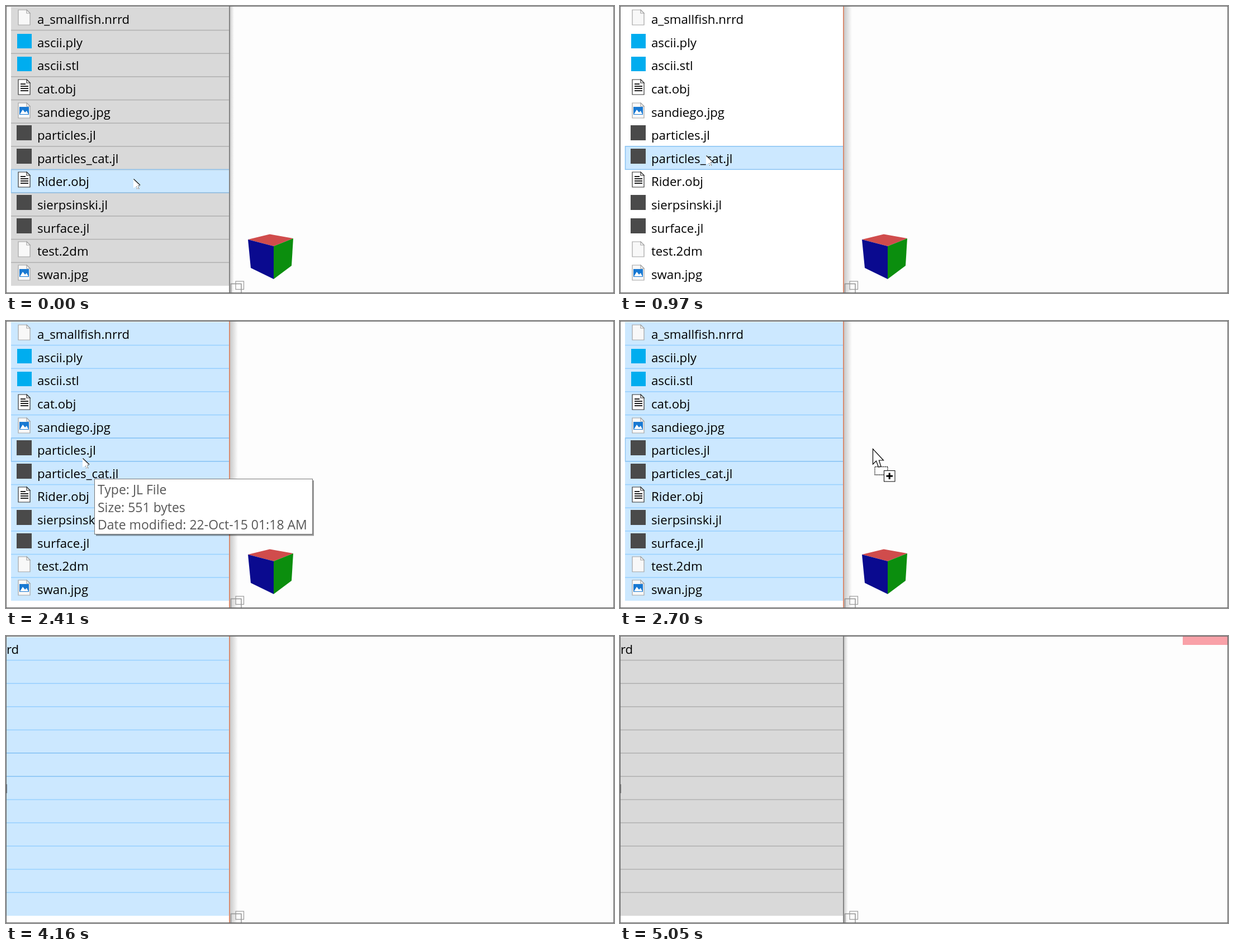
These frames come from a looping animation (1088 by 515 pixels, 8 s). An HTML page with a canvas:

```html
<!DOCTYPE html>
<html lang="en">
<head>
<meta charset="utf-8">
<title>Dragging files into a viewer</title>
<style>
  html, body { margin: 0; width: 100%; height: 100%; overflow: hidden; background: #fff; }
  canvas { display: block; width: 1088px; height: 515px; }
</style>
</head>
<body>
<canvas id="stage" width="1088" height="515"></canvas>
<script>
const ctx = document.getElementById('stage').getContext('2d');
const LOOP = 8000, WIDTH = 1088, HEIGHT = 515;
const PANEL_RIGHT = 399, LIST_LEFT = 9, LIST_WIDTH = 700, SCROLL = 198;
const FONT = '"Open Sans", "Noto Sans", sans-serif';

const files = [
  ['a_smallfish.nrrd', 'page'], ['ascii.ply', 'model'], ['ascii.stl', 'model'],
  ['cat.obj', 'text'], ['sandiego.jpg', 'image'], ['particles.jl', 'script'],
  ['particles_cat.jl', 'script'], ['Rider.obj', 'text'], ['sierpsinski.jl', 'script'],
  ['surface.jl', 'script'], ['test.2dm', 'page'], ['swan.jpg', 'image']
];

// Each entry: start time, x, y, pointer kind
const pointerPath = [
  [0, 228, 310, 'arrow'], [150, 216, 304, 'arrow'], [270, 192, 291, 'arrow'],
  [390, 166, 275, 'arrow'], [510, 154, 268, 'arrow'], [1120, 167, 246, 'arrow'],
  [2110, 157, 246, 'arrow'], [2270, 137, 246, 'arrow'],
  [2540, 76, 65, 'drag'], [2700, 452, 229, 'drag'], [2850, 428, 262, 'drag'],
  [3000, 490, 270, 'drag'], [3120, 535, 275, 'drag'], [3270, 545, 275, 'drag'],
  [3390, 552, 275, 'drag'], [3540, 553, 275, 'arrow'], [3920, 690, 350, 'arrow'],
  [4040, 808, 423, 'arrow'], [4160, 0, 0, 'none']
];
const hoverPath = [[0, 7], [270, 6], [1120, 5], [4910, -1]];

const latest = (path, t) => path.filter(step => step[0] <= t).pop();
const rowTop = i => 1.8 + 41.68 * i;

function box(color, x, y, w, h) {
  ctx.fillStyle = color;
  ctx.fillRect(x, y, w, h);
}

function frame(color, x, y, w, h, line = 1) {
  ctx.strokeStyle = color;
  ctx.lineWidth = line;
  ctx.strokeRect(x, y, w, h);
}

function polygon(points, fill, stroke) {
  ctx.beginPath();
  points.forEach(([x, y]) => ctx.lineTo(x, y));
  ctx.closePath();
  if (fill) { ctx.fillStyle = fill; ctx.fill(); }
  if (stroke) { ctx.strokeStyle = stroke; ctx.lineWidth = 1.2; ctx.stroke(); }
}

function text(string, x, y, size, color) {
  ctx.font = `${size}px ${FONT}`;
  ctx.fillStyle = color;
  ctx.fillText(string, x, y);
}

function sheet(fill, stroke) {
  polygon([[22, 7], [37, 7], [43, 13], [43, 34], [22, 34]], fill, stroke);
  polygon([[37, 7], [37, 13], [43, 13]], '#fff', stroke);
}

const icons = {
  page() { sheet('#f8f8f8', '#a3a3a3'); },
  model() { box('#00adef', 20, 8, 26, 26); },
  script() { box('#4a4a4a', 19, 6, 27, 27); },
  text() {
    sheet('#fff', '#333');
    for (let y = 14; y <= 29; y += 4) box('#222', 26, y, y < 17 ? 9 : 14, 2);
  },
  image() {
    sheet('#f8f8f8', '#a3a3a3');
    box('#1979d2', 24, 14, 17, 14);
    polygon([[25, 27], [30, 19], [34, 24], [37, 21], [40, 27]], '#fff');
  }
};

function drawList(t) {
  const active = t >= 970 && t < 4910;
  const allSelected = t < 970 || t >= 1270;
  const hover = latest(hoverPath, t)[1];
  box('#fff', 1, 1, PANEL_RIGHT - 1, HEIGHT - 2);

  ctx.save();
  ctx.beginPath();
  ctx.rect(1, 1, PANEL_RIGHT - 1, HEIGHT - 2);
  ctx.clip();
  if (t >= 2850) ctx.translate(-SCROLL, 0);

  files.forEach((file, i) => {
    const top = rowTop(i);
    const selected = allSelected || i === 6;
    let fill = selected ? (active ? '#cce8ff' : '#d9d9d9') : '#fff';
    if (i === hover) fill = selected ? '#cce8ff' : '#e5f3ff';
    box(fill, LIST_LEFT, top, LIST_WIDTH, 41.7);
  });
  if (allSelected) {
    for (let i = 1; i < files.length; i++) {
      box(active ? '#99d1ff' : '#b2b2b2', LIST_LEFT, rowTop(i) - .8, LIST_WIDTH, 1.6);
    }
  }
  const outlined = allSelected ? [hover] : [6, hover];
  outlined.filter(i => i >= 0).forEach(i =>
    frame('#8cc4f2', LIST_LEFT + .5, rowTop(i) - .2, LIST_WIDTH, 41.7, 1.3));

  files.forEach(([name, icon], i) => {
    ctx.save();
    ctx.translate(0, Math.round(41.64 * i));
    icons[icon]();
    text(name, 56, 32, 22.2, '#000');
    ctx.restore();
  });
  ctx.restore();

  drawEdge(active);
}

function drawEdge(active) {
  const reach = active ? 415 : 408;
  const shadow = ctx.createLinearGradient(401, 0, reach, 0);
  shadow.addColorStop(0, active ? '#c9c9c9' : '#cecece');
  shadow.addColorStop(1, '#fdfdfd');
  box(shadow, 401, 1, reach - 401, HEIGHT - 2);
  box(active ? '#d98c70' : '#858585', PANEL_RIGHT, 1, 2, HEIGHT - 2);
}

function drawCube() {
  const center = [479, 431], left = [433, 419], right = [514, 417], bottom = [479, 490];
  polygon([left, [472, 409.5], right, center], '#d04c4c');
  polygon([left, center, bottom, [438, 470]], '#0a0a8f');
  polygon([center, right, [511, 466], bottom], '#0b8e0e');
}

function drawTooltip(opacity) {
  ctx.save();
  ctx.globalAlpha = opacity;
  box('rgba(0,0,0,.4)', 161, 286, 390, 99.5);
  box('#fff', 158, 283, 391, 100);
  frame('#767676', 158.5, 283.5, 390, 99);
  ['Type: JL File', 'Size: 551 bytes', 'Date modified: 22-Oct-15 01:18 AM']
    .forEach((line, i) => text(line, 164, 311 + 31.7 * i, 23, '#575757'));
  ctx.restore();
}

const pointers = {
  none() {},
  arrow() {
    polygon([[0, 0], [0, 17], [4, 14], [7, 19], [10, 18], [8, 12], [13, 12]], '#fff');
    ctx.strokeStyle = '#111';
    ctx.lineWidth = 1.2;
    ctx.beginPath();
    ctx.moveTo(.5, .5);
    ctx.lineTo(12, 11.5);
    ctx.stroke();
    [[8, 12], [10, 12], [5, 14], [8, 15], [6, 17], [9, 17]]
      .forEach(([x, y]) => box('#333', x, y, 1.2, 1.2));
  },
  drag() {
    ctx.setLineDash([2, 1]);
    frame('#222', 4, 32.5, 23, 14.5, 1.3);
    ctx.setLineDash([]);
    polygon([[.5, .5], [.5, 28], [6.5, 22], [10.5, 33], [15, 32], [11.5, 21], [19.5, 21]],
      '#fff', '#000');
    box('#fff', 20, 39, 20, 20);
    frame('#000', 20.5, 39.5, 19.5, 19.5);
    box('#000', 24.5, 47.7, 11.5, 3);
    box('#000', 28.7, 43.5, 3, 11.5);
  }
};

function draw(t) {
  box('#fdfdfd', 0, 0, WIDTH, HEIGHT);
  drawList(t);
  frame('#8e8e8e', 402.5, 498.5, 18.5, 17, 1.4);
  frame('#999', 411, 494, 14.5, 14.5, 1.2);
  if (t < 3540) drawCube();
  if (t >= 2270 && t < 2540) drawTooltip(t < 2410 ? .6 : 1);
  if (t >= 5050) box('#f9a1a8', 1007, 1, 80, 15);

  const [, x, y, kind] = latest(pointerPath, t);
  ctx.save();
  ctx.translate(x, y);
  pointers[kind]();
  ctx.restore();
  frame('#646464', .5, .5, WIDTH - 1, HEIGHT - 1);
}

const start = performance.now();
function tick() {
  draw((performance.now() - start) % LOOP);
  requestAnimationFrame(tick);
}
tick();
</script>
</body>
</html>
```
